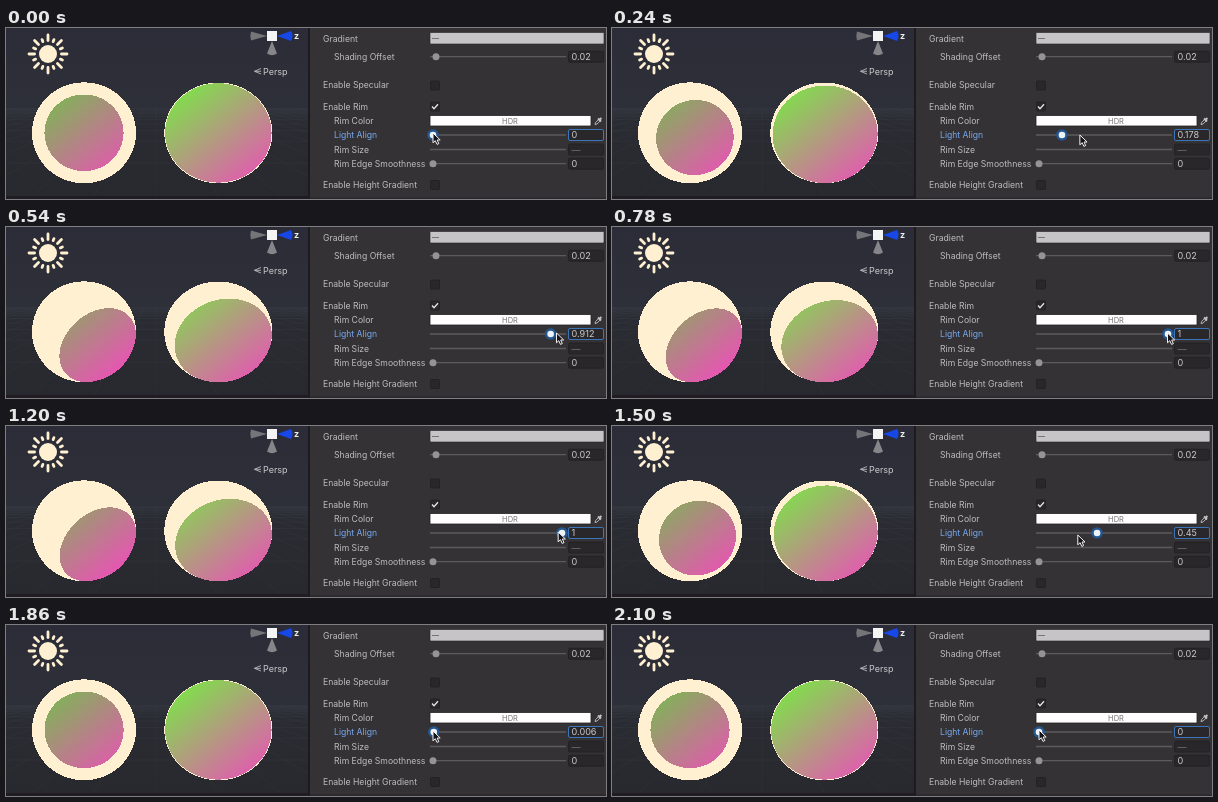
These frames come from a looping animation (600 by 171 pixels, 2.16 s). An HTML page with a canvas:

```html
<!DOCTYPE html>
<html lang="en">
<head>
<meta charset="utf-8">
<title>Rim light alignment</title>
<style>
  html, body { margin: 0; width: 100%; height: 100%; overflow: hidden; background: #353235; }
  svg, canvas { position: absolute; left: 0; top: 0; display: block; }
  text { font: 8.65px Inter, Roboto, sans-serif; fill: #bebcbe; }
  .track { stroke: #5d5a5d; stroke-width: 1.3; }
  .box { fill: #292729; stroke: #211f21; stroke-width: .8; }
  .num { font-size: 9.1px; fill: #cbc9cb; }
  .dot { fill: #969396; }
</style>
</head>
<body>
<svg id="stage" width="600" height="171" viewBox="0 0 600 171">
  <defs>
    <linearGradient id="sky" x1="0" y1="0" x2="0" y2="1">
      <stop offset="0" stop-color="#2b2c37"/>
      <stop offset=".47" stop-color="#2e3039"/>
      <stop offset=".55" stop-color="#2a2c33"/>
      <stop offset="1" stop-color="#28292e"/>
    </linearGradient>
    <clipPath id="ground"><rect y="80" width="302" height="88"/></clipPath>
  </defs>
  <rect width="303" height="171" fill="url(#sky)"/>
  <g id="grid" clip-path="url(#ground)" stroke="#fff" stroke-opacity=".04" stroke-width=".7"/>
  <rect y="168" width="303" height="3" fill="#211c24"/>
  <rect x="302" width="2" height="171" fill="#1e1b20"/>
  <rect x="304" y="169.5" width="296" height="1.5" fill="#2b272c"/>

  <g id="sun" fill="#fff0d2" stroke="#fff0d2" stroke-width="2.8" stroke-linecap="round">
    <circle cx="42" cy="26" r="9" stroke="none"/>
  </g>

  <path d="M261 8 L245 3.5 Q243.5 8 245 12.5Z" fill="#747479"/>
  <path d="M266 13 L261 25.5 Q266 29 271 25.5Z" fill="#85858a"/>
  <path d="M271 8 L285 3 Q288 8 285 13Z" fill="#1747e6"/>
  <rect x="261" y="3" width="10" height="10" fill="#f4f4f4"/>
  <text x="288" y="11" style="font-weight:700;font-size:9px;fill:#eee">z</text>
  <path d="M255 40.5L248.5 43.3L255 46M248.5 43.3H255" fill="none" stroke="#b9b9bd" stroke-width=".9"/>
  <text x="257" y="46.5" style="font-size:9px;fill:#c9c9cc">Persp</text>

  <g id="labels"></g>
  <g id="widgets"></g>
  <rect x="424" y="4.5" width="174" height="11.5" rx="1" fill="#c7c4c7" stroke="#242224" stroke-width=".6"/>
  <path d="M426 10.5H433" stroke="#777477" stroke-width="1"/>
  <path d="M426 78.5l2 2.3l4 -4.6" fill="none" stroke="#e6e4e6" stroke-width="1.3"/>
  <rect x="424" y="87.5" width="161" height="10.5" fill="#fffdfd" stroke="#242224" stroke-width=".8"/>
  <text x="504" y="96" text-anchor="middle" style="font-size:7.5px;fill:#777">HDR</text>
  <path d="M589 96.5l.6-2l3-3l1.5 1.5l-3 3z" fill="none" stroke="#c4c2c4" stroke-width=".9"/>
  <path d="M592 90.5l3 3M593.4 92l2-2" stroke="#c4c2c4" stroke-width="1.8"/>

  <rect x="562.5" y="101.5" width="35" height="11" rx="1.5" fill="#292729" stroke="#3c76b8"/>
  <text id="value" class="num" x="565.5" y="110.4"></text>
  <g id="knob">
    <circle r="5.8" fill="#24578f"/>
    <circle r="3.3" fill="#eef3f8"/>
  </g>
  <path id="pointer" d="M0 0V9.8L2.3 7.7L4 11.4L5.8 10.6L4.2 7H7.2Z" fill="#161416" stroke="#f4f2f4" stroke-width="1"/>
</svg>
<canvas id="balls" width="300" height="171"></canvas>
<script>
const NS = 'http://www.w3.org/2000/svg';
const STEP = 60, COUNT = 36;
const $ = id => document.getElementById(id);

function add(parent, tag, attrs, text) {
  const el = document.createElementNS(NS, tag);
  for (const k in attrs) el.setAttribute(k, attrs[k]);
  if (text) el.textContent = text;
  return $(parent).appendChild(el);
}

// Static scene
for (let i = 0; i < 16; i++) {
  add('sun', 'path', { d: 'M42 12.6V' + (i % 2 ? 10.4 : 7), transform: `rotate(${i * 22.5} 42 26)` });
}
for (let i = 1; i < 13; i++) {
  const y = 70 + 130 / i;
  add('grid', 'path', { d: `M0 ${y}H302` });
}
for (let i = -14; i <= 14; i++) {
  add('grid', 'path', { d: `M${150 + i * 11} 80L${150 + i * 62} 168` });
}

// Inspector
[
  [317, 13.6, 'Gradient'], [328, 32.1, 'Shading Offset'], [317, 60.4, 'Enable Specular'],
  [317, 81.6, 'Enable Rim'], [328, 96.2, 'Rim Color'], [328, 110.4, 'Light Align'],
  [328, 124.8, 'Rim Size'], [328, 139, 'Rim Edge Smoothness'], [317, 160.2, 'Enable Height Gradient']
].forEach(([x, y, s]) => {
  add('labels', 'text', { x, y, style: s === 'Light Align' ? 'fill:#76a9ef' : '' }, s);
});

function slider(y, knobX, text) {
  add('widgets', 'path', { class: 'track', d: `M424 ${y}H560` });
  if (knobX) add('widgets', 'circle', { class: 'dot', cx: knobX, cy: y, r: 3.5 });
  if (!text) return;
  add('widgets', 'rect', { class: 'box', x: 562.5, y: y - 5.5, width: 35, height: 11, rx: 1.5 });
  add('widgets', 'text', { class: 'num', x: 565.5, y: y + 3.4, style: text === '—' ? 'fill:#747174' : '' }, text);
}
slider(28.7, 430, '0.02');
slider(107);
slider(121.5, 0, '—');
slider(135.7, 427, '0');
for (const y of [53, 74, 152.5]) {
  add('widgets', 'rect', { class: 'box', x: 424.5, y, width: 9, height: 9, rx: 1 });
}

// Slider value per step; the pointer leads by one step
const UP = [0, 0, .029, .088, .178, .318, .498, .664, .803, .912, .961, .988];
const DOWN = [.974, .902, .771, .617, .45, .302, .194, .109, .052, .021, .006];
const valueAt = i => {
  i %= COUNT;
  if (i < UP.length) return UP[i];
  if (i < 21) return 1;
  return DOWN[i - 21] || 0;
};

const LIFT = [[0, 105], [4, 107], [9, 106], [20, 106], [25, 109], [31, 106], [35, 105]];
function pointerY(i) {
  const n = LIFT.findIndex(p => p[0] >= i);
  if (n < 1) return LIFT[0][1];
  const [a, ya] = LIFT[n - 1], [b, yb] = LIFT[n];
  return ya + (yb - ya) * (i - a) / (b - a);
}

// The rim edge is a plane cut through each sphere, tilting with the value
const mix = (a, b, t) => a + (b - a) * t;
const CREAM = [255, 240, 210];
const BALLS = [
  { x: 78, y: 104.8, rx: 52, ry: 50.4, tilt: [.693, .698], cut: [.65, .754], from: [118, 188, 78], to: [232, 84, 180] },
  { x: 212.3, y: 104.9, rx: 54, ry: 50.4, tilt: [.3, .56], cut: [.17, .457], from: [128, 222, 76], to: [224, 94, 174] }
];
const ctx = $('balls').getContext('2d');

function drawBalls(v) {
  const img = ctx.createImageData(300, 171);
  for (const b of BALLS) {
    const p = b.tilt[0] * v, q = b.tilt[1] * v, cut = mix(b.cut[0], b.cut[1], v);
    for (let py = 50; py < 160; py++) {
      for (let px = Math.floor(b.x - b.rx); px <= b.x + b.rx; px++) {
        const x = (px + .5 - b.x) / b.rx, y = (py + .5 - b.y) / b.ry;
        const zz = 1 - x * x - y * y;
        if (zz < 0) continue;
        const body = p * x + q * y + Math.sqrt(zz) > cut;
        const t = Math.min(1, Math.max(0, .5 + .31 * x + .36 * y));
        const at = (py * 300 + px) * 4;
        for (let c = 0; c < 3; c++) {
          img.data[at + c] = body ? mix(b.from[c], b.to[c], t) : CREAM[c];
        }
        img.data[at + 3] = 255;
      }
    }
  }
  ctx.putImageData(img, 0, 0);
}

let shown = -1;
const start = performance.now();
function render(now) {
  const i = Math.floor(Math.max(0, now - start) / STEP) % COUNT;
  if (i !== shown) {
    shown = i;
    const v = valueAt(i), next = valueAt(i + 1);
    $('value').textContent = String(v);
    $('knob').setAttribute('transform', `translate(${427 + 129 * v} 107)`);
    $('pointer').setAttribute('transform', `translate(${427 + 128.5 * next} ${pointerY(i)})`);
    drawBalls(((v + next) / 2) ** 1.12);
  }
  requestAnimationFrame(render);
}
render(start);
</script>
</body>
</html>
```
